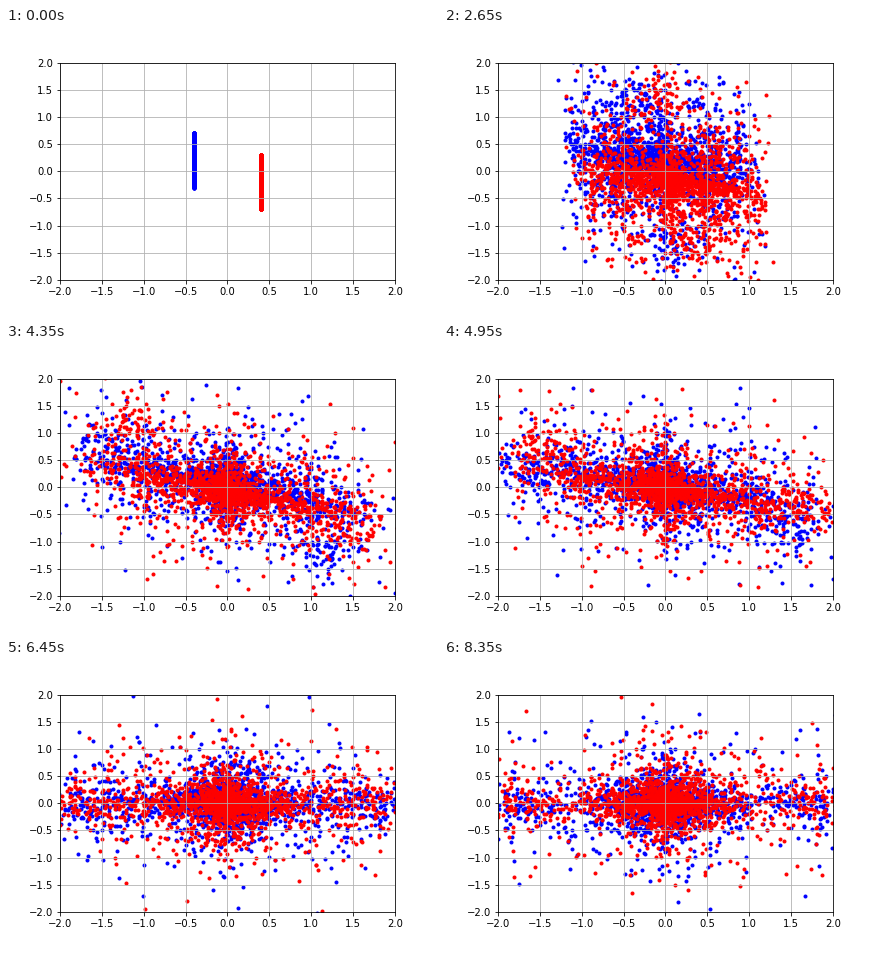
A matplotlib script for the animation above (8400 ms loop, 432 by 288 pixels).

```python
import numpy as np
import matplotlib.pyplot as plt
from matplotlib.animation import FuncAnimation

FRAMES = 168
N = 2000       # bodies per cluster
ARM = 60       # bodies in each tidal arm

rng = np.random.default_rng(7)
rod = rng.permutation(np.linspace(-0.5, 0.5, N))

# Orbit sizes: an ellipse with a dense middle and a long tail
reach = rng.gamma(1.6, 1, N)
heading = rng.uniform(0, 2 * np.pi, N)
amp_x = 0.68 * reach * np.cos(heading)
amp_y = 0.38 * reach * np.sin(heading)
arm_noise = rng.normal(0, 1, (2, ARM, 2))


def rates(amp, slow, fast):
    """Angular rates; wide orbits are slower."""
    return rng.uniform(slow, fast, N) / np.maximum(abs(amp), 0.15)


rate_x = rates(amp_x, 0.008, 0.030)
rate_y = rates(amp_y, 0.010, 0.050)


def bump(t, mid, width):
    return np.exp(-((t - mid) / width)**2)


def polar(radius, angle):
    return radius * np.array([np.cos(angle), np.sin(angle)])


def arm_middle(t, lag):
    """An arm swings out from the top round to the left."""
    u = np.clip((t - lag - 30) / 90, 0, 1)
    return polar(1.85 * np.tanh(t / 55), np.pi / 2 * (1 + u * u * (3 - 2 * u)))


def cluster(t):
    """Positions of the blue cluster; the red one is its point mirror."""
    tau = t**3 / (t**2 + 625)
    center = polar(np.hypot(0.4, 0.2) * bump(t, 0, 60),
                   np.arctan2(0.2, -0.4) - 0.015 * t)
    stretch = 1 + 0.6 * bump(t, 36, 22)
    shear = 0.32 * bump(t, 75, 35)

    dx = amp_x * np.sin(rate_x * tau)
    dy = stretch * amp_y * np.sin(rate_y * tau)
    dy += rod * bump(t, 0, 40) - shear * dx
    pos = center + np.column_stack([dx, dy])

    mix = min(1, (t / 30)**2)
    spread = 0.12 + 0.0015 * t, 0.27
    for k, (side, lag) in enumerate([(1, 0), (-1, 12)]):
        part = slice(k * ARM, (k + 1) * ARM)
        arm = side * arm_middle(t, lag) + arm_noise[k] * spread
        pos[part] += mix * (arm - pos[part])
    return pos


fig, ax = plt.subplots(figsize=(6, 4), dpi=72)
fig.subplots_adjust(left=0.125, right=0.9, bottom=0.125, top=0.88)
ticks = np.linspace(-2, 2, 9)
ax.set(xlim=(-2, 2), ylim=(-2, 2), xticks=ticks, yticks=ticks)
ax.grid(True)

start = cluster(0)
blue = ax.scatter(*start.T, marker=".", c="blue")
red = ax.scatter(*-start.T, marker=".", c="red")


def draw(i):
    pos = cluster(i)
    blue.set_offsets(pos)
    red.set_offsets(-pos)
    return blue, red


anim = FuncAnimation(fig, draw, frames=FRAMES, interval=50, repeat=True)
plt.show()
```
